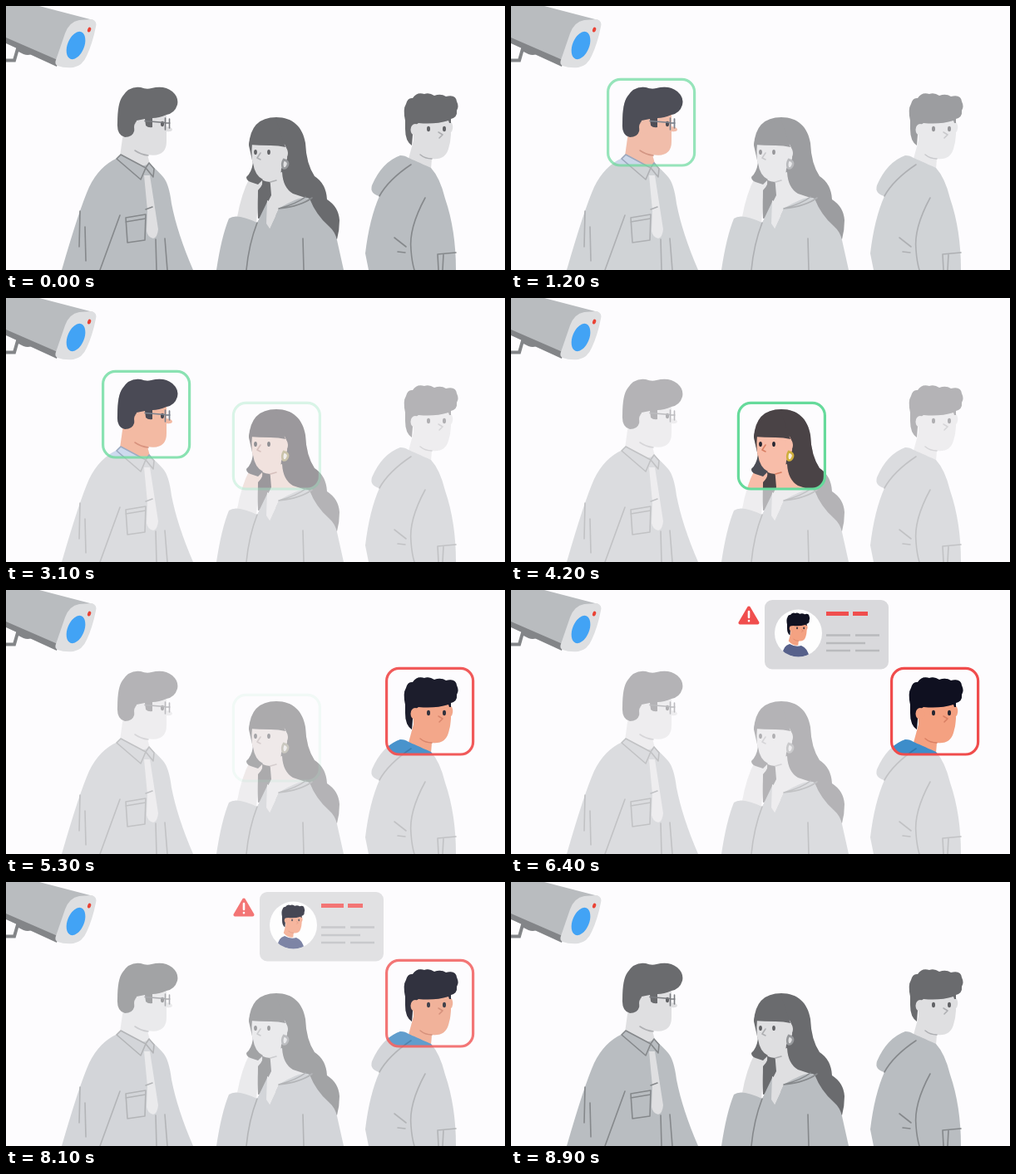
Write an HTML page that moves like this. It is 600 px wide and 318 px high and loops after 9000 ms.

```html
<!DOCTYPE html>
<html lang="en">
<head>
<meta charset="utf-8">
<title>Camera recognition</title>
<style>
  html, body { margin: 0; width: 100%; height: 100%; overflow: hidden; background: #fdfcfe; }
  svg { display: block; width: 600px; height: 318px; }
  .hair { fill: var(--hair); }
  .skin { fill: var(--skin); }
  .cloth { fill: var(--cloth); }
  .light { fill: var(--light); }
  .eye { fill: var(--eye); }
  .seam, .fold { fill: none; stroke: var(--seam); stroke-width: 1.6; stroke-linecap: round; stroke-linejoin: round; }
  .fold { stroke: var(--fold); }
  .glass { fill: none; stroke: var(--glass); stroke-width: 1.6; stroke-linecap: round; }
  .ring { fill: var(--light); stroke: var(--ring); stroke-width: 2.6; }
  .frame { fill: none; stroke-width: 3.2; }
  .ok { stroke: #66da9b; }
  .bad { stroke: #f04c4c; }
  .grey {
    --hair: #6a6b6e; --skin: #dfdfe1; --cloth: #b9bdc1; --light: #dfdfe1; --eye: #626366;
    --seam: #85888b; --fold: #aeafb2; --glass: #7a7c80; --ring: #96989b; --phone: #6a6b6e;
  }
  .man, .woman, .guy { --eye: #262732; --fold: #d97f63; --seam: #93a5c4; }
  .man { --hair: #2a2b37; --skin: #f5aa8d; --cloth: #c9d9f2; --light: #f3f5fa; --glass: #66717f; }
  .woman { --hair: #4a4346; --skin: #f8bda9; --cloth: #f1d9a5; --light: #fbeee0; --ring: #cfae3c; --phone: #4b4c55; }
  .guy { --hair: #0f1020; --skin: #f4a181; --cloth: #3d8dca; --seam: #2f76ad; }
</style>
</head>
<body>
<svg viewBox="0 0 600 318">
  <defs>
    <g id="man">
      <path class="skin" d="M142 145L137 181Q150 197 164 195L173 190L170 179Q193 183 193 163L193 124L158 124Z"/>
      <path class="skin" d="M193 145Q200 146 200 149Q199 152 193 151Z"/>
      <path class="hair" d="M143 158Q133 156 134 141Q134 117 140 109Q148 96 162 98Q169 101 175 99Q190 95 200 103Q208 110 206 119Q203 129 193 131Q184 135 176 135L176 146Q171 147 168 144L167 136L157 138Q155 145 154 151Q152 158 143 158Z"/>
      <ellipse class="skin" cx="161" cy="146" rx="7" ry="8"/>
      <path class="fold" d="M155 174Q162 179 171 180"/>
      <ellipse class="eye" cx="188" cy="142" rx="2" ry="3.2"/>
      <path class="glass" d="M167 138.5L191 140.5M191.5 135V149M196.5 136V147M191 141H197"/>
      <path class="cloth" d="M134 183Q112 193 100 218Q88 245 67 318H225Q206 274 199 238Q196 214 189 206Q184 200 173 190L163 193L138 179Z"/>
      <path class="light" d="M166 204L173 204L183 269Q182 279 177 280Q170 278 169 271L170 246Z"/>
      <path class="seam" d="M138 179L133 184L162 209L168 195L177 206L178 196L172 189M138 179L168 195L172 189M168 245L176 242M144 255L168 251L167 282L146 285ZM144 260L168 256M89 247L88 290M95 266L96 307M137 252L113 318M180 281L181 318M191 280L194 318"/>
    </g>

    <g id="woman">
      <path class="hair" d="M292 168Q294 134 325 134C345 134 357 146 360 165Q361 190 371 205Q385 214 386 233Q400 242 401 258Q401 270 398 281L340 250L303 256L301 208Z"/>
      <path class="skin" d="M317 204L332 200Q333 219 345 226L360 231L328 244L317 268L312 242L319 228Z"/>
      <path class="skin" d="M296 165Q294 186 299 200Q305 212 319 212Q330 211 331 196L338 184Q340 169 331 163Z"/>
      <path class="hair" d="M292 167Q296 140 325 138L336 170Q328 168 318 168Q304 168 292 167Z"/>
      <ellipse class="skin" cx="334" cy="177" rx="5" ry="7"/>
      <path class="ring" d="M334 185Q340 187 339 191Q337 197 333 195Q331 190 334 185Z"/>
      <ellipse class="eye" cx="300" cy="176" rx="1.9" ry="3.1"/>
      <ellipse class="eye" cx="316" cy="176" rx="1.9" ry="3.1"/>
      <path class="fold" d="M306 177L302 183L306 185M318 212L325 210"/>
      <path class="skin" d="M293 207Q283 226 278 254L301 262Q303 240 303 222Q311 214 307 208Z"/>
      <path d="M297 189Q295 201 289 206Q289 210 294 212L303 215L309 209Q299 204 297 189Z" fill="var(--phone)"/>
      <path class="cloth" d="M328 244Q356 227 365 232Q373 252 388 265Q396 272 398 282L406 318H253Q259 278 268 256Q277 249 302 261L314 236L317 268Z"/>
      <path class="light" d="M314 234L313 262L317 268L328 244L321 238Z"/>
      <path class="seam" d="M328 244Q355 241 368 231M328 244Q350 238 360 230M302 261Q292 287 289 318M357 280L358 318"/>
    </g>

    <g id="guyHead">
      <path class="skin" d="M489 140L490 162L484 184Q496 198 511 196L512 184Q528 186 532 172Q537 157 534 134Z"/>
      <ellipse class="skin" cx="534" cy="146" rx="3.2" ry="6.5"/>
      <path class="hair" d="M480 138Q477 124 481 118Q483 110 489 111Q494 103 503 106Q509 104 515 108Q523 105 529 109Q541 106 542 115Q545 121 542 126Q543 134 535 136L535 141H533L532 138Q516 143 496 141Q489 144 489 155L488 168Q480 163 480 148Z"/>
      <ellipse class="skin" cx="492" cy="149" rx="5.5" ry="7"/>
      <ellipse class="eye" cx="508" cy="148" rx="2" ry="3.3"/>
      <ellipse class="eye" cx="527" cy="148" rx="2" ry="3.3"/>
      <path class="fold" d="M520 152L525 155L521 159M498 179Q504 184 512 184"/>
    </g>
    <g id="guy">
      <use href="#guyHead"/>
      <path class="cloth" d="M474 180Q452 188 440 216Q437 226 449 229Q437 256 432 298L436 318H541Q541 270 528 232Q522 207 511 195Q491 186 484 183Q480 180 474 180Z"/>
      <path class="seam" d="M449 229Q460 209 487 191M504 231Q484 268 487 294Q488 308 491 318M467 279L481 290M471 296L480 297M520 318L519 299L541 297M525 318L526 299"/>
    </g>

    <clipPath id="manBox"><rect x="117" y="88" width="103" height="103" rx="14"/></clipPath>
    <clipPath id="womanBox"><rect x="274" y="127" width="103" height="103" rx="14"/></clipPath>
    <clipPath id="guyBox"><rect x="458" y="95" width="103" height="103" rx="14"/></clipPath>
    <clipPath id="badge"><circle cx="345.5" cy="52" r="28.5"/></clipPath>
  </defs>

  <g id="camera">
    <path d="M15 48L10 65.5H0" fill="none" stroke="#838588" stroke-width="4"/>
    <path d="M12 46L34 55Q29 61 21 58L13 54Z" fill="#838588"/>
    <path d="M0 36L64 62L61 73L0 45Z" fill="#838588"/>
    <path d="M0 0H40L105 17L80 40L62 65L0 38Z" fill="#b9bcbf"/>
    <path d="M71 33Q76 19 88 17L103 16Q110 18 108 25Q104 45 97 60Q92 72 81 74Q70 75 62 72Q58 70 60 65Z" fill="#dedfe1"/>
    <ellipse cx="84" cy="47.5" rx="10" ry="17.5" transform="rotate(22 84 47.5)" fill="#42a3f5"/>
    <ellipse cx="100.3" cy="28.5" rx="2" ry="3" transform="rotate(20 100 28)" fill="#ea4335"/>
  </g>

  <g id="crowd" class="grey">
    <use href="#man"/><use href="#woman"/><use href="#guy"/>
  </g>

  <g id="manMatch">
    <g clip-path="url(#manBox)"><use href="#man" class="man"/></g>
    <rect class="frame ok" x="116.6" y="88.4" width="104" height="103.6" rx="15"/>
  </g>
  <g id="womanMatch">
    <g clip-path="url(#womanBox)"><use href="#woman" class="woman"/></g>
    <rect class="frame ok" x="273.4" y="126.4" width="104" height="103.6" rx="15"/>
  </g>
  <g id="guyMatch">
    <g clip-path="url(#guyBox)"><use href="#guy" class="guy"/></g>
    <rect class="frame bad" x="457.6" y="94.4" width="104" height="103.6" rx="15"/>
  </g>

  <g id="alert">
    <path d="M286 21.5L275.5 39.5H296.5Z" fill="#f04c4c" stroke="#f04c4c" stroke-width="4" stroke-linejoin="round"/>
    <path d="M286 26V33M286 37V37.2" stroke="#fff" stroke-width="2.6" stroke-linecap="round"/>
    <rect x="305" y="12" width="149" height="83.5" rx="9" fill="#d9d9dc"/>
    <circle cx="345.5" cy="52" r="28.5" fill="#fff"/>
    <g clip-path="url(#badge)">
      <use href="#guyHead" class="guy" transform="translate(125.6 -17.7) scale(.43)"/>
      <path d="M327 82Q325 68 335 65Q342 69 349 67Q357 70 359 82Z" fill="#56608a"/>
    </g>
    <path d="M379 28.5H406M411 28.5H429" stroke="#f04c4c" stroke-width="5"/>
    <path d="M379 54.5H408M414 54.5H443M379 64H426M379 73H408M414 73H443" stroke="#b9babd" stroke-width="2.6"/>
  </g>
</svg>
<script>
  const LOOP = 9000, STEP = 100, FADE = 560;
  const EASE = 'cubic-bezier(.6, 0, .3, 1)';

  // Opacity at the start, then [time of fade, new opacity]
  const layers = {
    crowd: [1, [1000, 0.5], [8000, 1]],
    manMatch: [0, [1000, 1], [3000, 0]],
    womanMatch: [0, [3000, 1], [5000, 0]],
    guyMatch: [0, [5000, 1], [8000, 0]],
    alert: [0, [6000, 1], [8000, 0]]
  };

  function track(id, [start, ...fades]) {
    let opacity = start;
    const frames = [{ offset: 0, opacity }];
    for (const [time, next] of fades) {
      const from = time - STEP;
      frames.push({ offset: from / LOOP, opacity, easing: EASE });
      frames.push({ offset: (from + FADE) / LOOP, opacity: next });
      opacity = next;
    }
    frames.push({ offset: 1, opacity });
    const anim = document.getElementById(id).animate(frames, { duration: LOOP, fill: 'both' });
    anim.pause();
    return anim;
  }

  const tracks = Object.entries(layers).map(([id, plan]) => track(id, plan));
  const begin = performance.now();

  function draw() {
    const time = (performance.now() - begin) % LOOP;
    const held = Math.floor(time / STEP) * STEP;
    for (const anim of tracks) anim.currentTime = held;
    requestAnimationFrame(draw);
  }
  draw();
</script>
</body>
</html>
```
